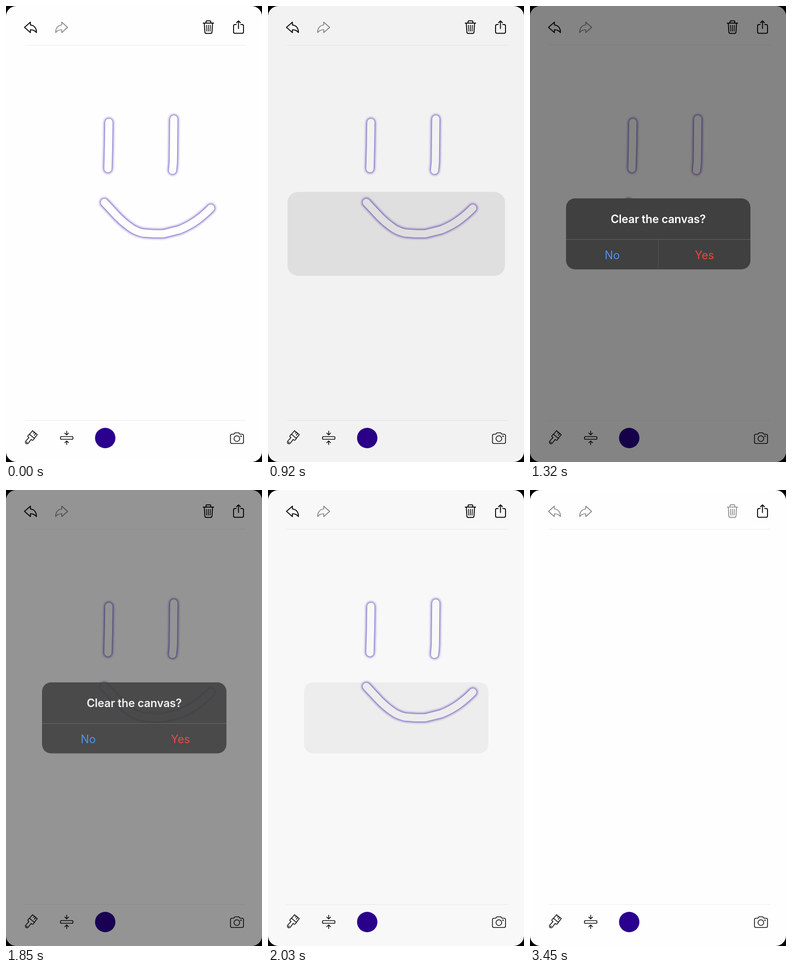
Animation of 540 by 960 pixels, one loop 3480 ms. Source, as an HTML page:

```html
<!DOCTYPE html>
<html lang="en">
<head>
<meta charset="utf-8">
<title>Clear the canvas</title>
<style>
  html, body { margin: 0; width: 100%; height: 100%; overflow: hidden; background: #000; }
  svg { display: block; width: 100vw; height: 100vh; }
  text { font-family: Inter, "Noto Sans", sans-serif; font-size: 23.6px; text-anchor: middle; }
  .icon { fill: none; stroke: #0c0c0c; stroke-width: 2; stroke-linecap: round; stroke-linejoin: round; }
  .thin { stroke-width: 1.6; }
  .off { stroke: #858585; stroke-width: 1.7; }
  .rule { stroke: #ebebeb; }
  .ink { fill: none; stroke-linecap: round; stroke-linejoin: round; }
</style>
</head>
<body>
<svg viewBox="0 0 540 960" xmlns="http://www.w3.org/2000/svg">
  <defs>
    <filter id="blur" filterUnits="userSpaceOnUse" x="170" y="200" width="300" height="320">
      <feGaussianBlur stdDeviation="2.4"/>
    </filter>
    <path id="face" d="M217 245L216.3 295L215 342.500M354 238L353 328L351.300 346M207.500 413.500L236 444Q252 460 268 470Q279 476 290 478L312 479.500H332L366 471Q388 462 404 450Q420 438 432 425.500"/>
    <path id="arrow" d="M39 45L51.500 34V40C59.500 40.500 64.500 47 64.200 56C61 51.500 57 50 51.500 50V56Z"/>
  </defs>

  <rect width="540" height="960" rx="22" fill="#fefefe"/>
  <path class="rule" d="M40 82.500H506M40 872.500H506"/>

  <g id="drawing" class="ink">
    <use href="#face" stroke="#4a2cb4" stroke-width="19" opacity=".8" filter="url(#blur)"/>
    <use href="#face" stroke="#fefefe" stroke-width="15.500"/>
  </g>

  <use id="undo" class="icon" href="#arrow"/>
  <use class="icon off" href="#arrow" transform="matrix(-1 0 0 1 169 0)"/>

  <g id="trash" class="icon">
    <path d="M416 36H438M422 36V33Q422 31.200 424 31.200H430Q432 31.200 432 33V36M418.300 36L419.500 55Q419.700 57.700 422.200 57.700H431.800Q434.300 57.700 434.500 55L435.700 36"/>
    <path class="thin" d="M423 40.500L423.500 53M427 40.500V53M431 40.500L430.500 53"/>
  </g>

  <path class="icon" d="M485.500 39H483Q480 39 480 42V54.500Q480 57.500 483 57.500H498Q501 57.500 501 54.500V42Q501 39 498 39H495.200M490.400 47.500V31.500M486.300 35.300L490.400 31.200L494.500 35.300"/>

  <g class="icon thin" transform="translate(52 909) rotate(40)" stroke-width="1.800">
    <path d="M-6.500 -4V-14H6.500V-4M2.500 -14V-9M-1.500 -14V-11"/>
    <path d="M-7 -4H7V0Q7 2 5 2H3L3.500 12A3.500 3.500 0 1 1 -3.500 12L-3 2H-5Q-7 2 -7 0Z"/>
    <circle cx="0" cy="12.500" r=".6"/>
  </g>

  <g class="icon thin" stroke-width="1.800">
    <rect x="114.800" y="906.500" width="26.500" height="5.800" rx="2.400"/>
    <path d="M128 895V902.500M124 899.200L128 903L132 899.200M128 923.500V916M124 919.500L128 915.700L132 919.500"/>
  </g>

  <circle cx="209.300" cy="909.500" r="21.500" fill="#2b008e"/>

  <g class="icon thin">
    <path d="M476.500 901.500H480.500L483 898.500H491L493.500 901.500H498Q501 901.500 501 904.500V918Q501 921 498 921H476.500Q473.500 921 473.500 918V904.500Q473.500 901.500 476.500 901.500Z"/>
    <circle cx="487" cy="910.700" r="6"/>
    <circle cx="495.800" cy="905.700" r=".7"/>
  </g>

  <rect id="dim" width="540" height="960" rx="22"/>

  <g id="alert">
    <rect x="76" y="405" width="389" height="149.500" rx="19" fill="#404040"/>
    <g id="content">
      <path d="M76 491.500H465" stroke="#646464"/>
      <path id="split" d="M270.500 492V554" stroke="#565656"/>
      <text x="270.400" y="457" fill="#fff" font-weight="600" letter-spacing="-.2">Clear the canvas?</text>
      <text x="173.500" y="532.500" fill="#4b90f3">No</text>
      <text x="368" y="532.500" fill="#f0453a">Yes</text>
    </g>
  </g>
</svg>
<script>
  const LOOP = 3480, OPEN = 898, CLOSE = 1824, MOVE = 404;
  const DIM = 0.482, RATE = 0.023;
  const CX = 270.4, CY = 479.8;
  const el = id => document.getElementById(id);
  const [drawing, undo, trash, dim, alertBox, content, split] =
    ["drawing", "undo", "trash", "dim", "alert", "content", "split"].map(el);

  // Critically damped spring from 0 to 1
  function spring(ms) {
    if (ms <= 0) return 0;
    if (ms >= MOVE) return 1;
    const x = ms * RATE;
    return 1 - (1 + x) * Math.exp(-x);
  }

  const show = (node, on) => node.setAttribute("visibility", on ? "inherit" : "hidden");

  function draw(t) {
    const grow = spring(t - OPEN);
    const alpha = grow - spring(t - CLOSE);
    const scale = 1.2 - 0.2 * grow;
    const cleared = t >= CLOSE + MOVE;

    dim.setAttribute("opacity", DIM * alpha);
    alertBox.setAttribute("opacity", alpha);
    alertBox.setAttribute("transform",
      `translate(${CX} ${CY}) scale(${scale}) translate(${-CX} ${-CY})`);
    content.setAttribute("opacity", Math.min(1, Math.max(0, (alpha - 0.1) / 0.5)));
    show(alertBox, alpha > 0);
    show(split, t < CLOSE);
    show(drawing, !cleared);
    undo.classList.toggle("off", cleared);
    trash.classList.toggle("off", cleared);
  }

  const start = performance.now();
  function tick() {
    draw((performance.now() - start) % LOOP);
    requestAnimationFrame(tick);
  }
  tick();
</script>
</body>
</html>
```
